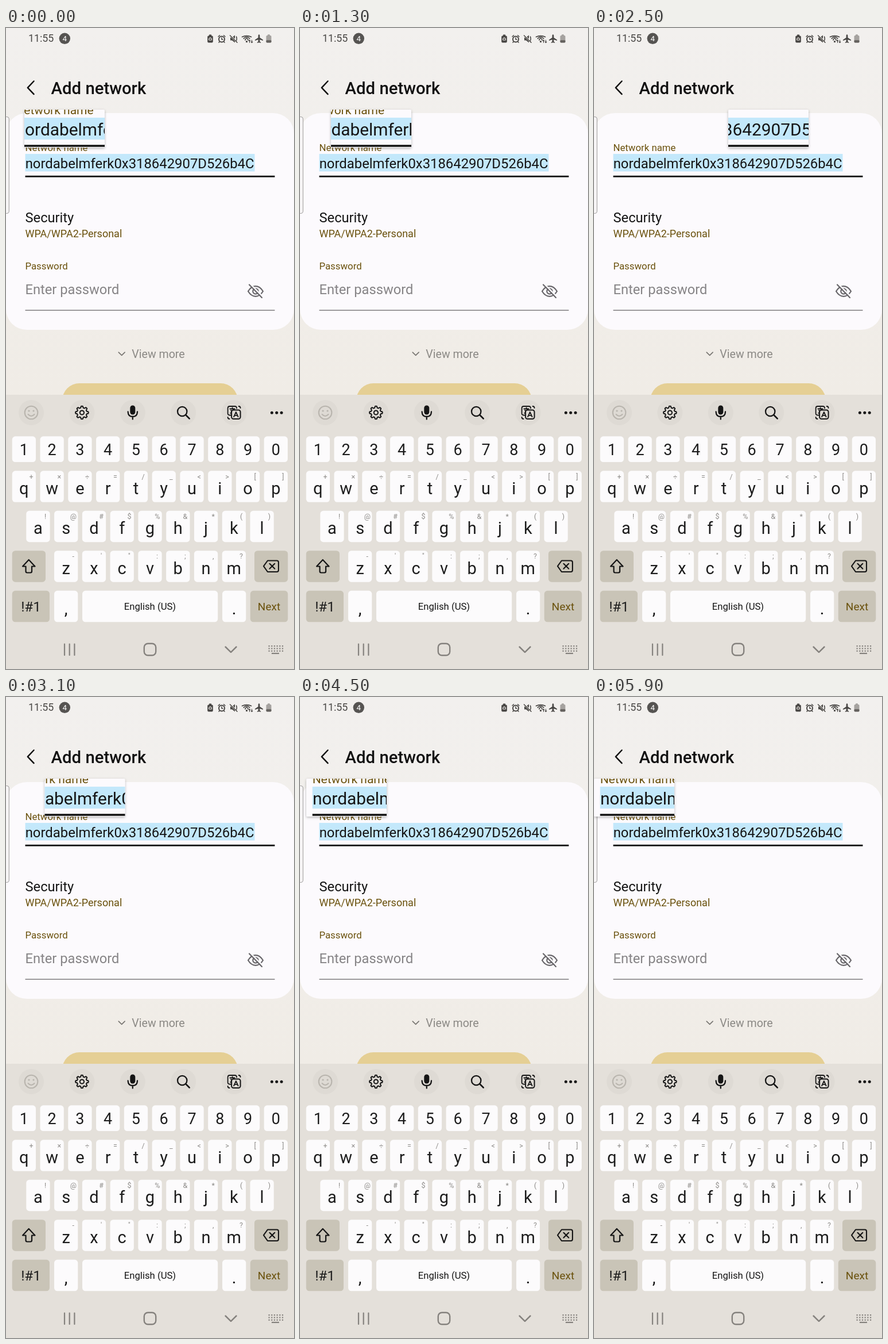
These frames come from a looping animation (502x1115 px, 6 s). An HTML page:

```html
<!DOCTYPE html>
<html lang="en">
<head>
<meta charset="utf-8">
<title>Add network</title>
<style>
  html, body { margin: 0; width: 100%; height: 100%; overflow: hidden; background: #f1eeea; }
  svg { display: block; }
  text { font-family: Roboto, "Noto Sans", sans-serif; }
</style>
</head>
<body>
<svg id="stage" width="100%" height="100%" viewBox="0 0 502 1115"></svg>
<script>
const INK = '#151515', GOLD = '#6a510c', KEY = '#fcfbfc', SPECIAL = '#c9c4b7', NAV = '#85827e';
const SSID = 'nordabelmferk0x318642907D526b4C';

const text = (x, y, size, str, fill = INK, attrs = '') =>
  `<text x="${x}" y="${y}" font-size="${size}" fill="${fill}" ${attrs}>${str}</text>`;
const mid = (x, y, size, str, fill) => text(x, y, size, str, fill, 'text-anchor="middle"');
const rect = (x, y, w, h, fill, r = 0, attrs = '') =>
  `<rect x="${x}" y="${y}" width="${w}" height="${h}" rx="${r}" fill="${fill}" ${attrs}/>`;
const circle = (x, y, r, fill, attrs = '') => `<circle cx="${x}" cy="${y}" r="${r}" fill="${fill}" ${attrs}/>`;
const line = (d, color = INK, width = 2.3) =>
  `<path d="${d}" fill="none" stroke="${color}" stroke-width="${width}" stroke-linecap="round" stroke-linejoin="round"/>`;
const shape = (d, fill) => `<path d="${d}" fill="${fill}"/>`;
const at = (x, y, body) => `<g transform="translate(${x} ${y})">${body}</g>`;
const esc = s => s.replace(/&/g, '&amp;').replace(/</g, '&lt;');

function statusBar() {
  const c = '#484644';
  const wave = r => line(`M${-r} ${5 - r}Q0 ${-2.5 - r * 0.55} ${r} ${5 - r}`, c, 1.7);
  return text(39, 24, 17.8, '11:55', c) + circle(102.3, 18.3, 9.7, '#565452') +
    mid(102.3, 23, 13.5, '4', '#fff') +
    at(356, 19, rect(-4.8, -5.6, 9.6, 12.2, c, 2) + rect(-2.2, -7.4, 4.4, 2.4, c, 0.8) +
      line('M-2 2a2.4 2.4 0 1 1 4 0Z', '#f1eeea', 1.2)) +
    at(376, 19, circle(0, 0.4, 5, 'none', `stroke="${c}" stroke-width="2"`) +
      line('M0 -2V1H2M-6 -4L-3.5 -6.3M6 -4L3.5 -6.3M-4 5L-5 6.2M4 5L5 6.2', c, 1.5)) +
    at(397, 19, shape('M-6 -2.5H-3L2 -6.5V6.5L-3 2.5H-6Z', c) +
      line('M-6 -6L6 6', '#f1eeea', 3) + line('M-6.5 -6L6 6.2M4.5 -4Q6 0 4.5 3', c, 1.5)) +
    at(419.5, 18.5, wave(8) + wave(5.2) + wave(2.6) + circle(0, 5.2, 1.6, c) +
      line('M5 7V2.5M3.6 4L5 2.4L6.4 4M9 2.5V7M7.6 5.6L9 7.1L10.4 5.6', c, 1.1)) +
    at(441, 18.5, shape('M0 -7.5Q1.4 -7 1.4 -5V-1.8L7 2V3.6L1.4 1.8V5L3.2 6.5V7.6L0 6.7L-3.2 7.6V6.5L-1.4 5V1.8L-7 3.6V2L-1.4 -1.8V-5Q-1.4 -7 0 -7.5Z', c)) +
    at(458, 18.5, rect(-4.5, -5.5, 9, 12.5, '#a5a29f', 1.8) + rect(-2, -7.3, 4, 2.3, '#a5a29f', 0.7) +
      rect(-4.5, 2.8, 9, 4.2, '#64615e', 1.4));
}

// Everything the magnifier can show
const field = `<g id="field">` +
  text(33.5, 213.8, 16.8, 'Network name', GOLD) +
  rect(33.5, 219, 400, 30.5, '#c3e8fb') +
  text(33.7, 243.6, 23.87, SSID) +
  rect(33.5, 256.8, 435, 2.8, '#111') + `</g>`;

function form() {
  return line('M48.5 92.5L37.8 103.8L48.5 115.2', '#111', 2.5) +
    text(78.5, 114.5, 29.3, 'Add network', '#111', 'font-weight="500"') +
    rect(0, 148, 502, 377, '#fcfafd', 36) + field +
    text(33.5, 338, 23.7, 'Security') +
    text(33.5, 363.6, 18, 'WPA/WPA2-Personal', GOLD) +
    text(33.5, 420.3, 16.8, 'Password', GOLD) +
    text(33.5, 463, 23.7, 'Enter password', '#868486') +
    rect(33.5, 490.3, 435, 1.4, '#747274') +
    at(435, 458, line('M-13 0Q-7.5 -8.8 0 -8.8T13 0Q7.5 8.8 0 8.8T-13 0Z', '#68666a', 2.2) +
      circle(0, 0, 4.7, 'none', 'stroke="#68666a" stroke-width="2.2"') +
      line('M-9 -12.5L13 9.5', '#fcfafd', 2.4) + line('M-11 -11.5L11 11', '#68666a', 2.2)) +
    line('M196.3 564.2L201.7 569.4L207.1 564.2', '#777571', 1.7) +
    text(219.3, 574.3, 19.6, 'View more', '#8b8985') +
    rect(98, 618, 306, 60, '#e5cf94', 30) +
    rect(-8, 154.5, 13.3, 168, '#f7f5f6', 4, 'stroke="#a9a7a7" stroke-width="1.2"');
}

function toolbar() {
  const gear = Array.from({ length: 49 }, (_, i) => {
    const a = i / 48 * 2 * Math.PI, r = 9.9 + 1.5 * Math.tanh(2.2 * Math.cos(8 * a));
    return `${i ? 'L' : 'M'}${(r * Math.cos(a)).toFixed(2)} ${(r * Math.sin(a)).toFixed(2)}`;
  }).join('') + 'Z';
  const pale = '#b9b5ae';
  const icons = [
    circle(0, 0, 11.3, 'none', `stroke="${pale}" stroke-width="2.1"`) + circle(-4, -3, 1.6, pale) +
      circle(4, -3, 1.6, pale) + line('M-5.5 3Q0 9 5.5 3', pale, 2),
    line(gear, INK, 2) + circle(0, 0, 3.6, 'none', `stroke="${INK}" stroke-width="2"`),
    rect(-4.5, -12.5, 9, 16, INK, 4.5) + line('M-8.2 -1.5Q-8 7 0 7T8.2 -1.5M0 7V11.5', INK, 2.3),
    circle(-2, -2, 8.2, 'none', `stroke="${INK}" stroke-width="2.3"`) + line('M4 4L10.5 10.5', INK, 2.5),
    line('M-6 4.5H-7.5Q-11 4.5 -11 1V-7.5Q-11 -11 -7.5 -11H1Q4.5 -11 4.5 -7.5M-7.2 -6.5H1M-3 -8.5V-6.5M-.5 -6Q-2 -1 -6.5 1M-5.5 -4Q-4 -1 -2 .2', INK, 1.8) +
      rect(-4.5, -4.5, 15.5, 15.5, '#dedad4', 3.5, `stroke="${INK}" stroke-width="2"`) +
      line('M-.5 7.4L3.3 -1L7 7.4M.8 4.8H5.8', INK, 1.8) + line('M8 -11Q11 -11 11 -8M-8 11Q-11 11 -11 8', INK, 1.8)
  ];
  return icons.map((icon, i) => at(44 + 88.4 * i, 669, circle(0, 0, 22, '#dedad4') + icon)).join('') +
    [463.4, 471.8, 480.2].map(x => circle(x, 669.3, 2.5, INK)).join('');
}

function keyRow(x0, y, h, letters, hints, size, baseline) {
  return [...letters].map((ch, i) => {
    const x = x0 + 48.78 * i;
    return rect(x, y, 41.3, h, KEY, 5.5) + mid(x + 20.6, baseline, size, ch, '#1d1d1d') +
      (hints ? mid(x + 33.3, y + 14.2, 12.5, esc(hints[i]), '#8d8b88') : '');
  }).join('');
}

function keyboard() {
  const special = (x, y, w) => rect(x, y, w, 54.5, SPECIAL, 5.5);
  return rect(0, 638, 502, 477, '#e4e0da') + toolbar() +
    keyRow(10.7, 710.3, 44.7, '1234567890', '', 27, 743.3) +
    keyRow(10.7, 770.3, 54.5, 'qwertyuiop', '+×÷=/_<>[]', 29, 810.5) +
    keyRow(35.3, 839.7, 54.5, 'asdfghjkl', '!@#$%&*()', 29, 880) +
    keyRow(84, 909.2, 54.5, 'zxcvbnm', '-\'":;,?', 29, 949.5) +
    special(10.7, 909.2, 58.3) + special(433, 909.2, 58.3) +
    line('M39.7 925L50.5 936.5H45V945Q45 947.5 42.5 947.5H37Q34.5 947.5 34.5 945V936.5H29Z', INK, 2.2) +
    line('M456 926.5H472Q475 926.5 475 929.5V943Q475 946 472 946H456L449 936.2ZM459.5 931.8L468.3 940.6M468.3 931.8L459.5 940.6', INK, 2.1) +
    special(10.7, 978.8, 65.3) + mid(43.5, 1014.8, 24.2, '!#1', '#1d1d1d') +
    rect(84, 978.8, 41.3, 54.5, KEY, 5.5) + mid(104.6, 1020, 29, ',', INK) +
    rect(133, 978.8, 236.2, 54.5, KEY, 5.5) + mid(251, 1012, 16.7, 'English (US)', INK) +
    rect(377, 978.8, 41.3, 54.5, KEY, 5.5) + mid(397.6, 1020, 29, '.', INK) +
    special(425.8, 978.8, 65.5) + mid(458.5, 1013, 19, 'Next', GOLD);
}

function navBar() {
  const dots = [0, 1, 2].flatMap(r => [0, 1, 2, 3, 4, 5].map(c =>
    rect(457.5 + 4.7 * c, 1074 + 4.3 * r, 2.2, 2.2, NAV))).join('');
  return line('M102 1071.5V1091M110.7 1071.5V1091M119.4 1071.5V1091', NAV, 2.2) +
    rect(240.8, 1070.8, 20.4, 20.4, 'none', 6.5, `stroke="${NAV}" stroke-width="2.4"`) +
    line('M382.5 1076.5L392 1085.8L401.5 1076.5', NAV, 2.5) +
    dots + rect(463, 1086.8, 13, 2.2, NAV);
}

const LENS = { y: 142, w: 140, h: 66, zoom: 1.25, top: 207.8, minCenter: 81 };
const lens = `<g id="lens">` +
  rect(0, LENS.y, LENS.w, LENS.h, '#fcfafd', 2, 'filter="url(#shadow)"') +
  `<svg id="view" y="${LENS.y}" width="${LENS.w}" height="${LENS.h}"><use href="#field"/></svg></g>`;

document.getElementById('stage').innerHTML =
  `<defs><linearGradient id="paper" x2="0" y2="1"><stop stop-color="#f2f0ee"/><stop offset="1" stop-color="#f0ece6"/></linearGradient>
   <filter id="shadow" x="-10%" y="-20%" width="120%" height="140%">
     <feDropShadow dx="0" dy="1.5" stdDeviation="2" flood-color="#000" flood-opacity=".28"/></filter></defs>` +
  rect(0, 0, 502, 640, 'url(#paper)') + statusBar() + form() + keyboard() + navBar() + lens;

// Lens left edge over time: [ms, x]
const PATH = [[0, 32], [300, 52], [700, 0], [900, 0], [1300, 54], [1600, 38], [2300, 202], [2500, 234],
  [2700, 298], [3000, 80], [3200, 55], [3700, 116], [4000, 85], [4400, 21], [4500, 11], [4800, 0],
  [5100, 22], [5400, 118], [5800, 6], [5900, 0], [6000, 32]];

function lensX(t) {
  const i = PATH.findIndex(([ms]) => ms > t);
  const [t0, a] = PATH[i - 1], [t1, b] = PATH[i];
  return a + (b - a) * (t - t0) / (t1 - t0);
}

const lensEl = document.getElementById('lens'), view = document.getElementById('view');

function draw(ms) {
  const t = Math.floor(ms % 6000 / 100) * 100;
  const x = lensX(t);
  const srcW = LENS.w / LENS.zoom, srcH = LENS.h / LENS.zoom;
  const center = Math.max(LENS.minCenter, x + LENS.w / 2);
  lensEl.setAttribute('transform', `translate(${x} 0)`);
  view.setAttribute('viewBox', `${center - srcW / 2} ${LENS.top} ${srcW} ${srcH}`);
}

const start = performance.now();
function tick() {
  draw(performance.now() - start);
  requestAnimationFrame(tick);
}
tick();
</script>
</body>
</html>
```
